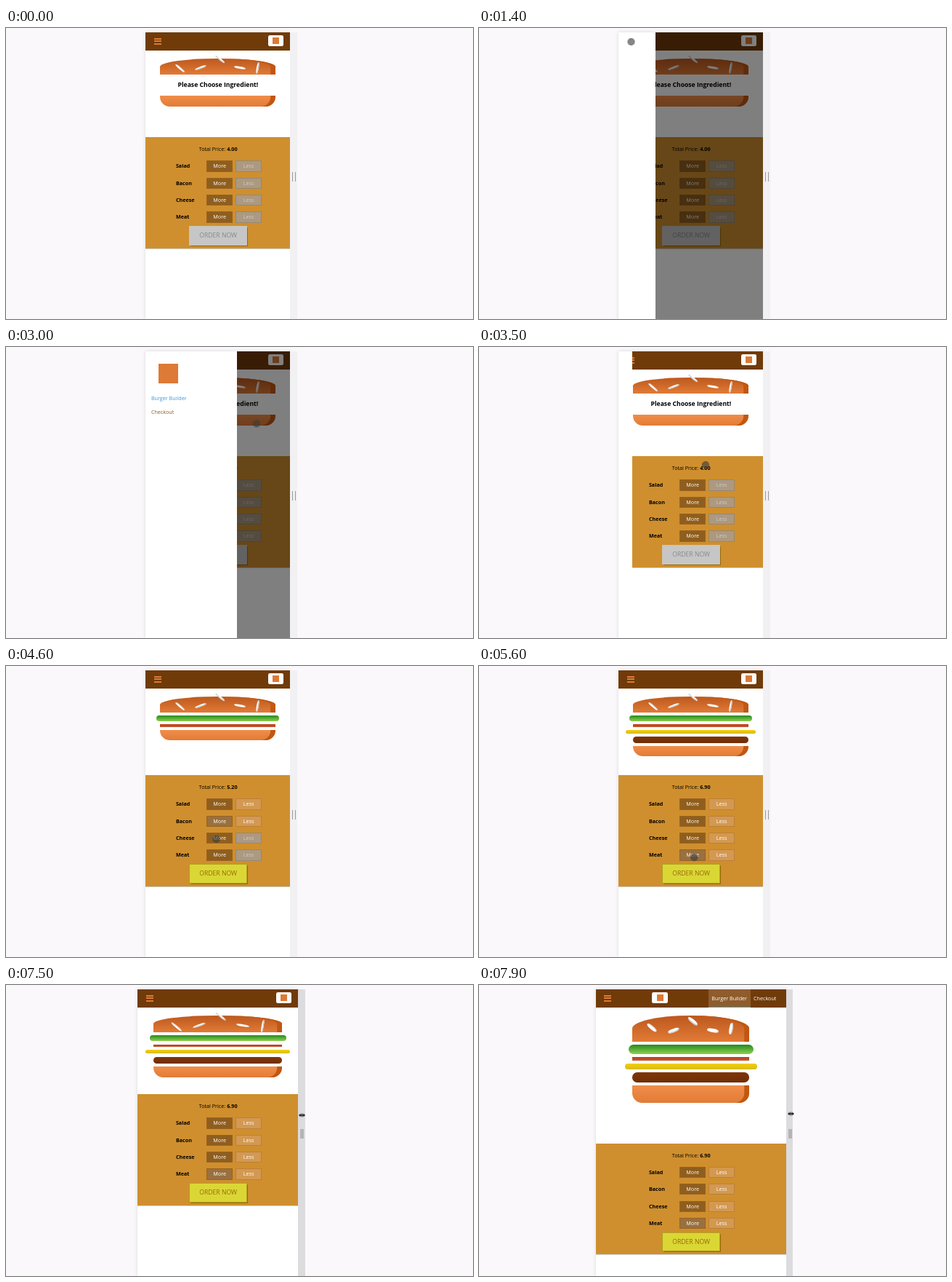
Write an HTML page that moves like this. It is 643x400 px and loops after 8000 ms.

```html
<!DOCTYPE html>
<html lang="en">
<head>
<meta charset="utf-8">
<title>Burger builder demo</title>
<style>
  /* --n counts added ingredients; everything on the page derives from it */
  @property --n { syntax: "<integer>"; inherits: true; initial-value: 0; }

  * { box-sizing: border-box; }
  html, body { margin: 0; width: 100%; height: 100%; overflow: hidden; }
  body { position: relative; background: #faf8fb; font: 7.2px/9.8px "Open Sans", sans-serif; color: #000; }
  p { margin: 0; }

  .stage { position: absolute; inset: 6px auto 0 0; width: 583.8px; }
  .frame {
    position: relative; width: 199px; height: 100%; margin: 0 auto;
    animation: resize 8s linear infinite, count 8s step-end infinite;
  }
  .frame::before { content: ""; position: absolute; inset: 0; box-shadow: 0 0 5px #0002; }
  .screen { container-type: inline-size; position: absolute; inset: 0; overflow: hidden; background: #fff; }
  .handle {
    position: absolute; left: 100%; top: 0; width: 9.5px; height: 100%;
    background: #f1f0f3; animation: grab 8s step-end infinite;
  }
  .handle::after {
    content: ""; position: absolute; left: 3px; top: 192px; width: 3px; height: 13px;
    border: solid #98979a; border-width: 0 1px; animation: grip 8s step-end infinite;
  }

  /* --on: at least i added; --is: exactly i added */
  [style] {
    --on: clamp(0, var(--n) - var(--i) + 1, 1);
    --is: calc(clamp(0, var(--n) - var(--i) + 1, 1) - clamp(0, var(--n) - var(--i), 1));
  }

  header {
    position: absolute; inset: 0 0 auto; height: 25.2px; padding: 0 9px 0 11.5px;
    display: flex; justify-content: space-between; align-items: center; background: #703b09;
  }
  .menu { position: relative; width: 10px; height: 9px; margin-top: -1px; border: solid #dd7a35; border-width: 2px 0; }
  .menu::after { content: ""; position: absolute; inset: 1.5px 0 auto; height: 2px; background: #dd7a35; }
  .logo { width: 21.5px; height: 15px; margin-top: -3px; border-radius: 2.3px; background: #fff; display: grid; place-items: center; }
  .mark { width: 9px; height: 9px; background: #dd7a35; }
  nav { display: none; height: 100%; color: #fff; line-height: 25.2px; }
  nav span { padding: 0 4.5px; }
  nav .active { background: #8f5c2c; border-bottom: 1.8px solid #40a4c8; }

  main { padding-top: 31.9px; }
  .burger { width: 100%; height: 112.5px; margin: auto; overflow: hidden; text-align: center; }
  .layer { width: 80%; height: calc(var(--h) * var(--on)); margin: calc(2% * var(--on)) auto; }
  .bun { position: relative; width: 80%; margin: 2% auto; box-shadow: inset -6.75px 0 #c15711; }
  .top { height: 20%; border-radius: 50% 50% 0 0; background: linear-gradient(#bc581e, #e27b36); }
  .bottom { height: 13%; border-radius: 0 0 13.5px 13.5px; background: linear-gradient(#f08e4a, #e27b36); }
  .salad { --h: 7%; width: 85%; border-radius: 9px; background: linear-gradient(#228c1d, #91ce50); }
  .bacon { --h: 3%; background: linear-gradient(#bf3813, #c45e38); }
  .cheese { --h: 4.5%; width: 90%; border-radius: 9px; background: linear-gradient(#f4d004, #d6bb22); }
  .meat { --h: 8%; border-radius: 6.75px; background: linear-gradient(#7f3608, #702e05); }
  /* once hidden, the negative margin cancels the next layer's gap */
  .empty {
    margin: 1em 0 calc(1em - 2% * (1 - var(--is)));
    font-size: calc(8.64px * var(--is)); line-height: 1.36; font-weight: 700; white-space: nowrap;
  }

  .seeds, .seeds::before, .seeds::after { position: absolute; background: #fff; border-radius: 40%; }
  .seeds { width: 10%; height: 15%; top: 50%; }
  .seeds::before, .seeds::after { width: 100%; height: 100%; }
  .left { left: 30%; rotate: -20deg; box-shadow: inset -.9px -1.35px #c9c9c9; }
  .left::before { content: ""; left: 180%; top: -50%; rotate: 60deg; box-shadow: inset -.45px -1.35px #c9c9c9; }
  .left::after { content: ""; left: -170%; top: -260%; rotate: 60deg; box-shadow: inset -.45px .9px #c9c9c9; }
  .right { left: 64%; rotate: 10deg; box-shadow: inset -1.35px 0 #c9c9c9; }
  .right::before { content: ""; left: 150%; top: -130%; rotate: 90deg; box-shadow: inset .45px 1.35px #c9c9c9; }

  .panel { position: relative; height: 152.3px; background: #cf8f2e; box-shadow: 0 .9px .5px #ccc; }
  .controls { position: absolute; left: 50%; top: 0; white-space: nowrap; }
  .controls > * { position: absolute; }
  .price { left: -26.2px; top: 12px; padding-right: 2px; }
  .price b { position: absolute; left: 100%; opacity: var(--is); }
  .row { left: -58px; top: calc(9.3px + 23.3px * var(--i) - 0px); height: 15.2px; line-height: 15.2px; font-weight: 700; }
  .row span {
    position: absolute; top: 0; width: 35.5px; height: 15.2px; line-height: 13.6px;
    border: 1px solid; text-align: center; font-weight: 400;
  }
  .row .more {
    left: 42.5px; color: #fff; border-color: #996220;
    background: color-mix(in srgb, #99703f calc(100% * var(--is)), #8f5e1e);
  }
  .row .less {
    left: 82.5px;
    color: color-mix(in srgb, #fff calc(100% * var(--on)), #ccc);
    border-color: color-mix(in srgb, #bd8038 calc(100% * var(--on)), #978771);
    background: color-mix(in srgb, #d39952 calc(100% * var(--on)), #ac9980);
  }
  .order {
    left: -39.5px; top: 121.7px; width: 79.5px; height: 26.5px; border: 1px solid;
    font-size: 8.64px; line-height: 25px; text-align: center;
    color: color-mix(in srgb, #966909 calc(100% * var(--on)), #888);
    border-color: color-mix(in srgb, #b5a01f calc(100% * var(--on)), #c9c4b8);
    background: color-mix(in srgb, #dad735 calc(100% * var(--on)), #c7c6c6);
    box-shadow: .9px .9px .9px #966909;
  }

  @container (min-width: 225px) {
    nav { display: flex; }
    .burger { width: 201.5px; height: 180px; }
  }

  .shade { position: absolute; inset: 0; background: #000; opacity: 0; animation: shade 8s step-end infinite; }
  .drawer {
    position: absolute; inset: 0 auto 0 0; width: 126px; background: #fff; color: #8f5c2c;
    translate: -100%; animation: drawer 8s ease-out infinite;
  }
  .drawer > * { position: absolute; left: 7.5px; }
  .drawer .mark { left: 17.5px; top: 17px; width: 27px; height: 27px; }
  .drawer .active { top: 60px; color: #4096d8; }
  .drawer .other { top: 78.8px; }

  .pointer { position: absolute; left: 0; top: 0; opacity: 0; }
  .touch {
    width: 10px; height: 10px; margin: -5px; border-radius: 50%;
    background: #3c3c3c9e; box-shadow: inset 0 0 0 1px #3c3c3c40;
    animation: touch 8s linear infinite, touch-seen 8s step-end infinite;
  }
  .arrow { animation: arrow 8s linear infinite, arrow-seen 8s step-end infinite; }
  .split { margin: -3px -4.5px; animation: split 8s linear infinite, split-seen 8s step-end infinite; }

  @keyframes count { 0% { --n: 0; } 49.4% { --n: 1; } 54.4% { --n: 2; } 60.6% { --n: 3; } 66.9%, 100% { --n: 4; } }
  @keyframes resize { 0%, 88.75% { width: 199px; } 93.75% { width: 221px; } 98.75%, 100% { width: 262px; } }
  @keyframes grab { 0% { background: #f1f0f3; } 78.75%, 100% { background: #dcdbdd; } }
  @keyframes grip { 0% { background: none; } 78.75%, 100% { background: #b4b3b5; border-color: #b4b3b5; } }
  @keyframes shade { 0% { opacity: 0; } 16.5% { opacity: .5; } 41.25%, 100% { opacity: 0; } }
  @keyframes drawer { 0%, 16.5% { translate: -100%; } 20.25%, 41.25% { translate: 0; } 45%, 100% { translate: -100%; } }
  @keyframes arrow { 0%, 1.25% { translate: 121px 322px; } 7.5%, 100% { translate: 191px 100px; } }
  @keyframes arrow-seen { 0% { opacity: 0; } 1.25% { opacity: 1; } 7.5%, 100% { opacity: 0; } }
  @keyframes touch {
    0%, 7.5% { translate: 198px 92px; }
    11.25% { translate: 208px 21px; }
    12.5%, 18.75% { translate: 209.5px 19px; }
    23.75% { translate: 259px 75px; }
    27.5% { translate: 324px 75px; }
    31.25% { translate: 366px 62px; }
    35% { translate: 355px 100px; }
    38.75%, 41.25% { translate: 340px 108px; }
    43.75% { translate: 312px 162px; }
    47.5%, 50% { translate: 294px 191px; }
    53%, 55% { translate: 292px 214px; }
    57.5%, 61% { translate: 289.5px 238px; }
    64%, 67% { translate: 293px 261px; }
    72.5% { translate: 299px 265px; }
    75% { translate: 335px 290px; }
    78.75%, 100% { translate: 391px 190px; }
  }
  @keyframes touch-seen { 0% { opacity: 0; } 7.5% { opacity: 1; } 78.75%, 100% { opacity: 0; } }
  @keyframes split {
    0%, 88.75% { translate: 394px 181px; }
    93.75% { translate: 407px 179px; }
    98.75%, 100% { translate: 429px 177px; }
  }
  @keyframes split-seen { 0% { opacity: 0; } 78.75%, 100% { opacity: 1; } }

  /* rows are numbered from 1 */
  .row { top: calc(9.3px + 23.3px * (var(--i) - 1) + 23.3px - 0.5px); }
</style>
</head>
<body>
<div class="stage">
  <div class="frame">
    <div class="screen">
      <main>
        <div class="burger">
          <div class="bun top"><div class="seeds left"></div><div class="seeds right"></div></div>
          <p class="empty" style="--i:0">Please Choose Ingredient!</p>
          <div class="layer salad" style="--i:1"></div>
          <div class="layer bacon" style="--i:2"></div>
          <div class="layer cheese" style="--i:3"></div>
          <div class="layer meat" style="--i:4"></div>
          <div class="bun bottom"></div>
        </div>
        <div class="panel">
          <div class="controls">
            <p class="price">Total Price:
              <b style="--i:0">4.00</b><b style="--i:1">4.50</b><b style="--i:2">5.20</b><b style="--i:3">5.60</b><b style="--i:4">6.90</b>
            </p>
            <div class="row" style="--i:1">Salad<span class="more">More</span><span class="less">Less</span></div>
            <div class="row" style="--i:2">Bacon<span class="more">More</span><span class="less">Less</span></div>
            <div class="row" style="--i:3">Cheese<span class="more">More</span><span class="less">Less</span></div>
            <div class="row" style="--i:4">Meat<span class="more">More</span><span class="less">Less</span></div>
            <div class="order" style="--i:1">ORDER NOW</div>
          </div>
        </div>
      </main>
      <header>
        <div class="menu"></div>
        <div class="logo"><div class="mark"></div></div>
        <nav><span class="active">Burger Builder</span><span>Checkout</span></nav>
      </header>
      <div class="shade"></div>
      <div class="drawer">
        <div class="mark"></div>
        <span class="active">Burger Builder</span>
        <span class="other">Checkout</span>
      </div>
    </div>
    <div class="handle"></div>
  </div>
</div>
<svg class="pointer arrow" width="7" height="10"><path d="M.5.5v8l2-1.8 1.3 2.8 1.2-.6-1.3-2.7h2.6z" stroke="#fff" stroke-width=".6"/></svg>
<svg class="pointer split" width="9" height="6"><path d="M0 3l2.8-2.5v1.8h3.4V.5L9 3 6.2 5.5V3.7H2.8v1.8zM4 .5h1v5H4z" fill="#222"/></svg>
<div class="pointer touch"></div>
</body>
</html>
```
